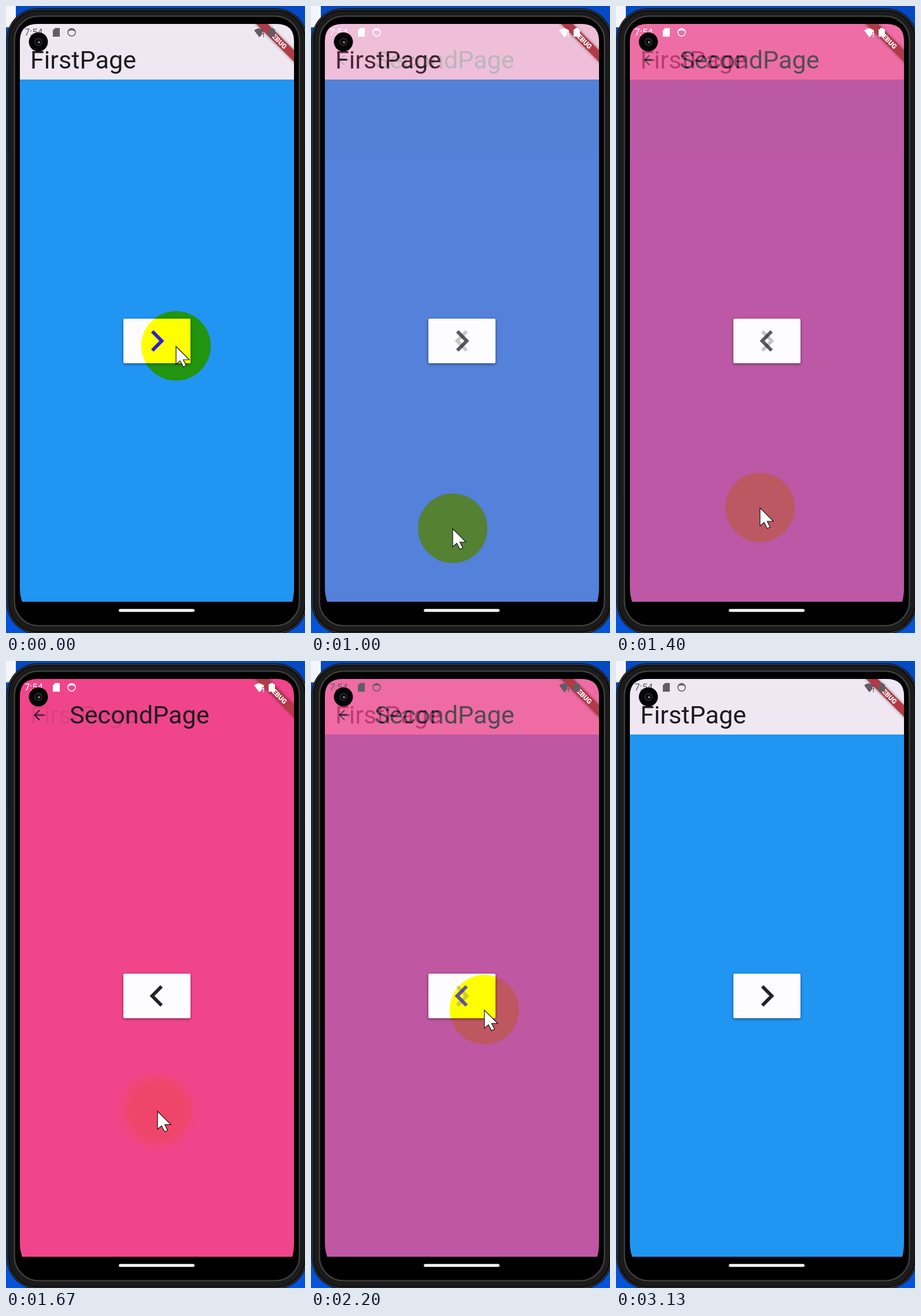
Recreate the animation shown at these times as an HTML page. Size 517 px wide and 1083 px high, loop 3190 ms.

```html
<!DOCTYPE html>
<html lang="en">
<head>
<meta charset="utf-8">
<title>Page fade</title>
<style>
  html, body { margin: 0; width: 100%; height: 100%; overflow: hidden; background: #000; }
  svg { display: block; width: 100vw; height: 100vh; font-family: Roboto, sans-serif; }
  .title { font-size: 43.2px; fill: #1d1b20; }
  .chevron { fill: none; stroke-width: 6; }
  .spot { mix-blend-mode: multiply; }
</style>
</head>
<body>
<svg viewBox="0 0 517 1083">
  <defs>
    <linearGradient id="desk" x2="0" y2="1">
      <stop stop-color="#0549c4"/><stop offset="1" stop-color="#0453d8"/>
    </linearGradient>
    <clipPath id="screen">
      <path d="M24 61Q24 31 54 31H468Q498 31 498 61V1005Q498 1018 495 1029H28Q24 1018 24 1005Z"/>
    </clipPath>
    <clipPath id="button"><rect x="203" y="540" width="116" height="77" rx="2"/></clipPath>
    <filter id="soft" x="-20%" y="-50%" width="140%" height="200%"><feGaussianBlur stdDeviation="2.5"/></filter>
  </defs>

  <!-- desktop and phone body -->
  <rect width="517" height="1083" fill="url(#desk)"/>
  <path d="M0 0H17V37H0Z" fill="#f6f5fb"/>
  <path d="M0 36.5H17" stroke="#c9c8d2"/>
  <g fill="none">
    <rect x="1" y="4" width="520" height="1081" rx="54" fill="#080808"/>
    <rect x="3" y="6" width="516" height="1077" rx="52" stroke="#343436" stroke-width="2"/>
    <rect x="10" y="13" width="502" height="1063" rx="46" stroke="#1b1b1c" stroke-width="9"/>
    <rect x="14.5" y="17.5" width="493" height="1053" rx="42" stroke="#454547" stroke-width="2"/>
    <rect x="17" y="20" width="488" height="1048" rx="40" fill="#000"/>
  </g>
  <path d="M197.500 1044H323.500" stroke="#fff" stroke-width="5" stroke-linecap="round"/>

  <g clip-path="url(#screen)">
    <rect x="24" y="31" width="474" height="998" fill="#2195f2"/>
    <rect x="24" y="31" width="474" height="96" fill="#efe8f3"/>
    <text class="title" x="42" y="108">FirstPage</text>

    <g id="second">
      <rect x="24" y="31" width="474" height="998" fill="#f0458b"/>
      <path d="M67 93.500H50M58 85L49.500 93.500L58 102" fill="none" stroke="#1d1b20" stroke-width="2"/>
      <text class="title" x="110" y="108">SecondPage</text>
    </g>
    <text id="trace" class="title" x="42" y="108">FirstPage</text>

    <!-- debug ribbon -->
    <g transform="translate(470.300 58.700) rotate(45)">
      <rect x="-60" y="-7" width="120" height="14" fill="#000" opacity=".5" filter="url(#soft)"/>
      <rect x="-60" y="-7" width="120" height="14" fill="#b13a44"/>
      <text y="4.200" text-anchor="middle" font-size="11.800" font-weight="900" fill="#fff">DEBUG</text>
    </g>

    <!-- status bar -->
    <g id="status">
      <text x="32" y="51" font-size="16.500">7:54</text>
      <path d="M85 38H93V53H81V42Z"/>
      <circle cx="113.500" cy="45.500" r="6.500" fill="none" stroke="currentColor" stroke-width="1.600"/>
      <path d="M107 44Q113.500 33 120 44Q113.500 40 107 44Z"/>
      <path d="M429 42Q437 35 446 42V45H443V49L438 54Z"/>
      <path d="M444 46H446V50H444ZM444 51.500H446V53.500H444Z"/>
      <path d="M457 38H462V40H465V53H454V40H457Z"/>
    </g>

    <circle id="glow" class="spot" r="60"/>

    <rect x="203" y="541.500" width="116" height="77" rx="2" opacity=".45" filter="url(#soft)"/>
    <rect x="203" y="540" width="116" height="77" rx="2" fill="#fdfcfe"/>
    <g clip-path="url(#button)">
      <circle id="shine" r="60" fill="#ff0"/>
    </g>
    <path id="next" class="chevron" d="M253 562L269.300 578.500L253 595"/>
    <path id="back" class="chevron" d="M269 562L252.700 578.500L269 595"/>
  </g>

  <!-- camera -->
  <circle cx="56" cy="62" r="16.500" fill="#050505"/>
  <circle cx="56" cy="62" r="7.500" fill="#1d1d1f"/>
  <circle cx="56" cy="62" r="4" fill="#08080a"/>
  <circle cx="57" cy="62.500" r="1.600" fill="#b5b5bb"/>

  <path id="cursor" d="M0 0V31L7 25L12.500 35.500L17.500 33L12.500 23H23Z"
        fill="#fff" stroke="#111" stroke-width="1.200"/>
</svg>

<script>
const LOOP = 3190, PUSH = 810, PUSH_END = 1600, POP = 2140, POP_END = 2400, LEAVE = 2420;
// time, x, y of the pointer
const path = [
  [0, 294, 587], [470, 279, 578], [690, 279, 578], [960, 245, 902], [1010, 245, 902],
  [1400, 249, 866], [1480, 249, 860], [2010, 293, 579], [2160, 293, 579], [LEAVE, 395, 925]
];
const $ = id => document.getElementById(id);
const clamp = v => Math.min(1, Math.max(0, v));
const ramp = (t, a, b) => clamp((t - a) / (b - a));
const ease = u => u * u * (3 - 2 * u);

function pointer(t) {
  const i = path.findIndex(p => p[0] > t);
  if (i < 0) return path[path.length - 1].slice(1);
  const [a, b] = [path[i - 1], path[i]];
  const u = ease(ramp(t, a[0], b[0]));
  return [a[1] + (b[1] - a[1]) * u, a[2] + (b[2] - a[2]) * u];
}

function draw(now) {
  const t = now % LOOP;
  const fade = ramp(t, PUSH, PUSH_END) * (1 - ramp(t, POP, POP_END));
  const [x, y] = pointer(t);
  const shown = t < LEAVE;
  const hover = shown && Math.hypot(x - 261, y - 578) < 60;

  $('second').style.opacity = fade;
  $('trace').style.opacity = fade > .9 ? .09 : 0;

  const tint = t >= PUSH && t < POP ? '#fff' : '#625d64';
  $('status').style.color = tint;
  $('status').style.fill = tint;

  for (const id of ['glow', 'shine']) {
    $(id).setAttribute('cx', x);
    $(id).setAttribute('cy', y);
    $(id).style.display = shown ? '' : 'none';
  }
  $('glow').style.fill = `rgb(255,255,${255 * (.06 + .7 * fade)})`;
  $('glow').style.filter = fade > .8 ? `blur(${(fade - .8) * 40}px)` : '';

  $('next').style.stroke = $('back').style.stroke = hover ? '#2f20d0' : '#232326';
  $('next').style.opacity = 1 - fade;
  $('back').style.opacity = fade;

  $('cursor').setAttribute('transform', `translate(${x} ${y + 1})`);
  $('cursor').style.display = shown ? '' : 'none';
}

const start = performance.now();
function tick() {
  draw(performance.now() - start);
  requestAnimationFrame(tick);
}
tick();
</script>
</body>
</html>
```
